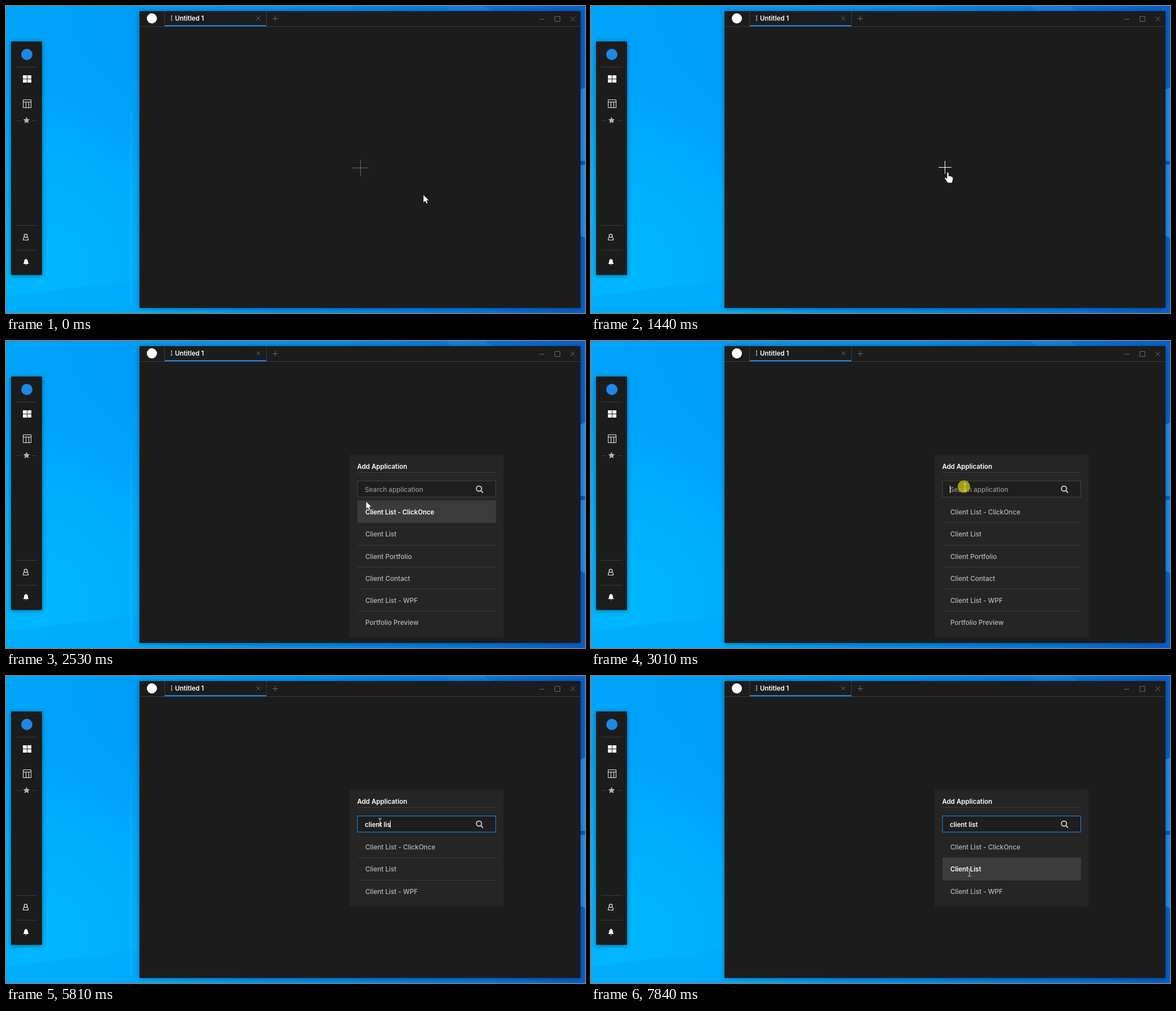
An HTML page for the animation above (8 s loop, 1028 by 545 pixels).

```html
<!DOCTYPE html>
<html lang="en">
<head>
<meta charset="utf-8">
<title>Add Application</title>
<style>
html, body { margin: 0; width: 100%; height: 100%; overflow: hidden; background: #00a4fa; }
svg { display: block; width: 100vw; height: 100vh; }
text { font: 500 11.7px Inter, sans-serif; white-space: pre; }
.bold { font-weight: 600; font-size: 11.5px; fill: #fff; }
.rule { fill: none; stroke: #3a3a3a; }
.dim { fill: none; stroke: #686868; }
</style>
</head>
<body>
<svg viewBox="0 0 1028 545">
  <defs>
    <linearGradient id="sky" x1="0" y1="0" x2="1" y2="0">
      <stop offset="0" stop-color="#00a5fb"/>
      <stop offset=".23" stop-color="#009cf5"/>
      <stop offset=".55" stop-color="#008ff0"/>
      <stop offset=".85" stop-color="#0474dc"/>
      <stop offset="1" stop-color="#075fcb"/>
    </linearGradient>
    <radialGradient id="glow" gradientUnits="userSpaceOnUse" cx="60" cy="470" r="420">
      <stop offset="0" stop-color="#00b7ff"/>
      <stop offset=".5" stop-color="#00b2ff" stop-opacity=".75"/>
      <stop offset="1" stop-color="#00a5fb" stop-opacity="0"/>
    </radialGradient>
    <filter id="shadow" x="-5%" y="-5%" width="110%" height="110%">
      <feDropShadow dx="0" dy="1" stdDeviation="4" flood-opacity=".4"/>
    </filter>
    <path id="arrow" d="M0 0V14.2L3.3 11.2 5.4 16 8 14.9 5.9 10.2H10.2Z" fill="#fff" stroke="#111" stroke-width=".7"/>
    <path id="hand" d="M0 1.5Q1.5-1 3 1.5V7L5 6.6 7 7.5 9 8 10.5 9.5V14Q9.5 16 9 19H1.5L-4 11.5Q-4.5 9.5-2.5 9.5L0 11.5Z" fill="#fff" stroke="#111" stroke-width=".6"/>
    <path id="beam" d="M-3-6.5H-1L0-5.5 1-6.5H3M0-5.5V5.5M-3 6.5H-1L0 5.5 1 6.5H3" fill="none" stroke="#ddd"/>
  </defs>

  <rect width="1028" height="545" fill="url(#sky)"/>
  <rect width="480" height="545" fill="url(#glow)"/>
  <path d="M0 516L237 485V545H0Z" fill="#00a8fb" opacity=".55"/>
  <path d="M780 0H850L862 9H790Z" fill="#2b8ff0" opacity=".35"/>
  <path d="M1020 148L1028 145V275H1020ZM1020 282H1028V412L1020 408Z" fill="#1c8cf0"/>
  <path d="M1020 275H1028V282H1020Z" fill="#0558b4"/>

  <g filter="url(#shadow)">
    <rect x="9" y="63" width="55" height="414.500" fill="#1e1e1e"/>
    <rect x="237" y="9" width="783" height="527" fill="#1e1e1e"/>
  </g>

  <g id="sidebar">
    <circle cx="37" cy="86" r="10" fill="#1e88e5"/>
    <path class="rule" d="M18 108.500H56M18 203.500H28M46 203.500H56M18 389.500H56M18 433.500H56"/>
    <path d="M30 123h7v6h-7zM38 123h7v6h-7zM30 130h7v6h-7zM38 130h7v6h-7z" fill="#fff"/>
    <path d="M30.500 166.500h14v14h-14zM30.500 170.500h14M35.500 170.500v10M40.500 170.500v10" fill="none" stroke="#eee"/>
    <path d="M36.500 197l1.700 3.800 4.100.5-3 2.800.8 4.100-3.600-2.100-3.600 2.100.8-4.100-3-2.800 4.100-.5z" fill="#b5b5b5"/>
    <g fill="none" stroke="#eee" stroke-width="1.200">
      <circle cx="35" cy="408" r="2.800"/>
      <path d="M32.700 410Q30.600 411 30.600 415.500H39.400Q39.400 411 37.300 410"/>
    </g>
    <path d="M30.500 458Q32.300 456 32.300 453Q32.300 450 35 449.500V448.800H36V449.500Q38.700 450 38.700 453Q38.700 456 40.500 458ZM34 459H37Q35.500 461 34 459Z" fill="#fff"/>
  </g>

  <g id="titlebar">
    <circle cx="259" cy="22" r="9" fill="#fff"/>
    <path class="rule" d="M237 36.500H1020M281.500 9V36M462.500 9V36"/>
    <path d="M282 35H462" stroke="#1e88e5" stroke-width="2"/>
    <path d="M293 17h2v2h-2zM293 20.500h2v2h-2zM293 24h2v2h-2z" fill="#ccc"/>
    <text class="bold" x="300" y="25.500">Untitled 1</text>
    <path class="dim" d="M444.500 18.500l7 7m0-7l-7 7M473 22.500h10M478 17.500v10M947 23.500h9M974.500 18.500h9v9h-9zM1002 18.500l8.500 8.500m0-8.500l-8.500 8.500"/>
  </g>

  <path id="plus" fill="none"/>

  <g id="panel">
    <rect id="panelBack" x="610" y="202" width="273.500" fill="#252525"/>
    <text class="bold" x="623.500" y="226.500">Add Application</text>
    <path class="rule" d="M624 233.500H870"/>
    <rect id="field" x="624" y="248.500" width="245.500" height="28.500" fill="#1e1e1e"/>
    <text id="hint" x="637" y="267.500" fill="#929292">Search application</text>
    <text id="typed" class="bold" x="637" y="267.500"></text>
    <path id="caret" d="M0 256.500V270" stroke="#fff"/>
    <g fill="none" stroke="#c4c4c4" stroke-width="2">
      <circle cx="839.800" cy="262" r="4.600"/><path d="M843 265.500L847 269.500"/>
    </g>
    <g id="list"></g>
  </g>

  <circle id="click" cx="662" cy="258.500" r="11" fill="#b5ad0c" opacity=".88"/>
  <use id="cursor"/>
</svg>
<script>
const $ = id => document.getElementById(id);
const LOOP = 8000, ROW = 39.25, LIST_TOP = 284;
const apps = ["Client List - ClickOnce", "Client List", "Client Portfolio",
  "Client Contact", "Client List - WPF", "Portfolio Preview"];
const query = "client list";
const keyTimes = [3880, 4080, 4150, 4420, 4880, 5140, 5340, 5610, 5740, 5810, 6010];

// Each key is [time, value, value, ...]; values are interpolated linearly.
function track(keys, t) {
  const next = keys.findIndex(key => key[0] > t);
  if (next === 0) return keys[0].slice(1);
  if (next < 0) return keys[keys.length - 1].slice(1);
  const a = keys[next - 1], b = keys[next], k = (t - a[0]) / (b[0] - a[0]);
  return a.slice(1).map((v, i) => v + (b[i + 1] - v) * k);
}
const within = (t, from, to) => t >= from && t < to;

const pointerPath = [[0, 741, 335], [420, 720, 332], [810, 689, 323], [1150, 642, 300],
  [1300, 632, 295], [1720, 632, 295], [1980, 631, 293], [2460, 631, 293], [2730, 662, 261],
  [2870, 664, 259.5], [6600, 664, 259.5], [6670, 665, 254.5], [7000, 665, 254.5],
  [7350, 659, 297], [7560, 664, 338], [7700, 671, 360], [7840, 672, 349]];
const pointerShapes = [[0, "arrow"], [1150, "hand"], [1720, "arrow"], [2600, "beam"],
  [7210, "arrow"], [7800, "beam"]];
const plusSize = [[0, 14.5], [400, 16.5], [800, 14.5], [1150, 14.5], [1300, 11.5]];
const hovers = {
  0: [[1980, 0], [2120, 1], [2530, 1], [2730, 0], [7350, 0], [7430, 1], [7500, 1], [7600, 0]],
  1: [[7500, 0], [7630, 1]]
};

const rows = apps.map((name, i) => {
  const make = (tag, attrs) => {
    const node = document.createElementNS("http://www.w3.org/2000/svg", tag);
    for (const key in attrs) node.setAttribute(key, attrs[key]);
    return group.appendChild(node);
  };
  const group = $("list").appendChild(document.createElementNS("http://www.w3.org/2000/svg", "g"));
  const line = make("path", { class: "rule", d: "M624 -.5H870" });
  const back = make("rect", { x: 624, width: 246, y: -1, height: 40, fill: "#3c3c3c" });
  const label = make("text", { x: 638, y: 23.5 });
  label.textContent = name;
  return { name, group, line, back, label };
});

function drawList(t, text) {
  let shown = 0;
  const needle = text ? "c" : "";
  for (const row of rows) {
    const name = row.name.toLowerCase();
    const match = text.length > 7 ? name.includes(text) : name.includes(needle);
    row.group.style.display = match ? "" : "none";
    if (!match) continue;
    const hover = hovers[shown] ? track(hovers[shown], t)[0] : 0;
    const grey = 184 + 71 * hover;
    row.group.setAttribute("transform", `translate(0 ${Math.round(LIST_TOP + ROW * shown)})`);
    row.line.style.display = shown ? "" : "none";
    row.back.style.opacity = hover;
    row.label.style.fill = `rgb(${grey},${grey},${grey})`;
    row.label.style.fontWeight = hover > .5 ? 600 : 500;
    row.label.style.fontSize = hover > .5 ? "11.4px" : "11.7px";
    shown++;
  }
  $("panelBack").setAttribute("height", 89 + ROW * shown);
}

function draw(t) {
  const half = track(plusSize, t)[0], lit = t >= 1150;
  const cx = lit ? 628.5 : 629.5, cy = lit ? 286.5 : 287.5;
  $("plus").setAttribute("d", `M${cx - half} ${cy}h${2 * half}M${cx} ${cy - half}v${2 * half}`);
  $("plus").setAttribute("stroke", lit ? "#fff" : "#666");

  $("panel").style.opacity = track([[1690, 0], [1860, 1]], t)[0];
  const text = query.slice(0, keyTimes.filter(k => k <= t).length);
  $("typed").textContent = text;
  $("hint").style.display = text ? "none" : "";
  $("field").setAttribute("stroke", t >= 3080 ? "#1e88e5" : "#444");
  drawList(t, text);

  const caretOn = within(t, 2980, 3550) || within(t, 3880, 6540) || within(t, 7070, 7600);
  const caretX = Math.floor(637 + (text ? $("typed").getComputedTextLength() : 0)) + .5;
  $("caret").style.display = caretOn ? "" : "none";
  $("caret").setAttribute("transform", `translate(${caretX} 0)`);

  $("click").style.display = within(t, 2940, 3150) ? "" : "none";
  const [x, y] = track(pointerPath, t);
  $("cursor").setAttribute("href", "#" + pointerShapes.filter(s => s[0] <= t).pop()[1]);
  $("cursor").setAttribute("transform", `translate(${x} ${y})`);
}

const start = performance.now();
function tick() {
  draw((performance.now() - start) % LOOP);
  requestAnimationFrame(tick);
}
tick();
</script>
</body>
</html>
```
